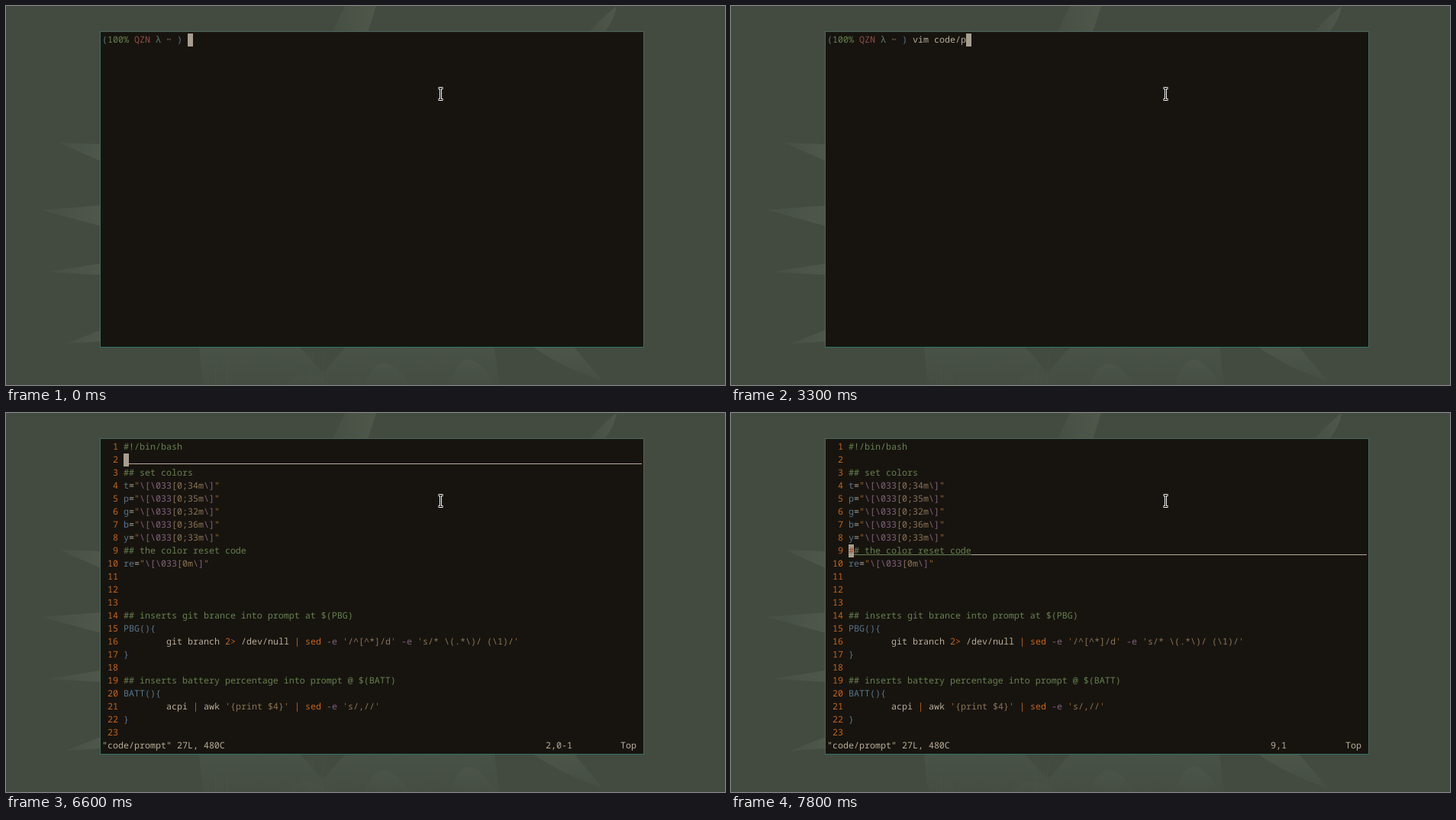
Recreate the animation shown at these times as an HTML page. Size 942x496 px, loop 8 s.

```html
<!DOCTYPE html>
<html lang="en">
<head>
<meta charset="utf-8">
<title>Terminal session</title>
<style>
  html, body { margin: 0; width: 100%; height: 100%; overflow: hidden; background: #434b40; }
  svg { display: block; width: 942px; height: 496px; }
  text { font: 11.667px "Noto Sans Mono", "DejaVu Sans Mono", monospace; white-space: pre; text-rendering: geometricPrecision; }
</style>
</head>
<body>
<svg id="stage" viewBox="0 0 942 496">
  <defs>
    <linearGradient id="fade">
      <stop offset="0" stop-color="#4e574a" stop-opacity=".35"/>
      <stop offset="1" stop-color="#4e574a"/>
    </linearGradient>
    <linearGradient id="petal" x2="0" y2="1">
      <stop offset="0" stop-color="#4c5548"/>
      <stop offset="1" stop-color="#464e43"/>
    </linearGradient>
  </defs>
  <rect width="942" height="496" fill="#434b40"/>
  <g fill="url(#fade)">
    <path d="M428 34L444 0H485L474 34Z"/>
    <path d="M764 34Q782 14 800 0Q798 16 784 34Z"/>
    <path d="M70 179L124 181V203Z"/>
    <path d="M47 267L124 261V288Z"/>
    <path d="M54 348L124 337V352Z"/>
    <path d="M78 442L124 424V439Z"/>
  </g>
  <g fill="url(#petal)">
    <path d="M253 446H385L415 480L445 446H640L646 496H258Z" opacity=".7"/>
    <path d="M690 446H744L782 491Q730 474 690 446Z"/>
    <path d="M365 496Q395 470 425 496ZM470 496Q490 440 530 496ZM582 496Q600 430 642 496Z"/>
  </g>
  <g id="rays" stroke="#4e574a" fill="none" opacity=".6"></g>
  <rect x="123.5" y="33.5" width="712" height="413" fill="#17140f" stroke="#4a645a"/>
  <path d="M123 446.5H836" stroke="#2f7168"/>
  <g id="shell"></g>
  <g id="editor"></g>
  <g id="caret"></g>
  <g fill="none">
    <path id="beam" d="M566.5 107.5H572.5M569.5 107.5V122.5M566.5 122.5H572.5" stroke="#fff" stroke-width="3"/>
    <path d="M567 107.5H572M569.5 107.5V122.5M567 122.5H572" stroke="#000"/>
  </g>
</svg>
<script>
const CELL = 7, ROW = 17, LEFT = 126, TOP = 36, LOOP = 8000, CODE_COL = 4;
const color = {
  cream: '#b8ac98', green: '#66804f', blue: '#57758a', orange: '#c4641b',
  purple: '#84617c', tan: '#8b7355', red: '#8f4f48', quote: '#a1662c',
  block: '#a89e8f', teal: '#5b806a'
};
const byId = id => document.getElementById(id);
const shell = byId('shell'), editor = byId('editor'), caret = byId('caret');

function add(parent, tag, attrs, content) {
  const node = document.createElementNS('http://www.w3.org/2000/svg', tag);
  for (const key in attrs) node.setAttribute(key, attrs[key]);
  if (content) node.textContent = content;
  return parent.appendChild(node);
}

const xOf = col => LEFT + col * CELL;
const yOf = row => TOP + row * ROW;
const write = (parent, row, col, content, fill) =>
  add(parent, 'text', { x: xOf(col), y: yOf(row) + 12, fill }, content);
const box = (parent, x, y, width, height, fill) =>
  add(parent, 'rect', { x, y, width, height, fill });

// Calls visit(hue, text, column) for each coloured run.
function eachRun(runs, col, visit) {
  for (const [hue, content] of runs) {
    visit(color[hue], content, col);
    col += content.length;
  }
}
const writeRuns = (parent, row, col, runs) =>
  eachRun(runs, col, (hue, content, at) => write(parent, row, at, content, hue));

const comment = content => [['green', content]];
const quoted = content => [['quote', "'"], ['tan', content], ['quote', "'"]];
const escape = (name, code) => [
  ['blue', name], ['cream', '='], ['quote', '"'], ['purple', '\\[\\033'],
  ['tan', `[${code}m`], ['purple', '\\]'], ['quote', '"']
];
const pipe = ['orange', '| '];
const sed = [['orange', 'sed '], ['purple', '-e ']];

const source = [
  comment('#!/bin/bash'),
  [],
  comment('## set colors'),
  ...['t34', 'p35', 'g32', 'b36', 'y33'].map(s => escape(s[0], '0;' + s.slice(1))),
  comment('## the color reset code'),
  escape('re', '0'),
  [], [], [],
  comment('## inserts git brance into prompt at $(PBG)'),
  [['blue', 'PBG(){']],
  [['cream', '        git branch '], ['orange', '2>'], ['cream', ' /dev/null '], pipe, ...sed,
    ...quoted('/^[^*]/d'), ['purple', ' -e '], ...quoted('s/* \\(.*\\)/ (\\1)/')],
  [['blue', '}']],
  [],
  comment('## inserts battery percentage into prompt @ $(BATT)'),
  [['blue', 'BATT(){']],
  [['cream', '        acpi '], pipe, ['cream', 'awk '], ...quoted('{print $4}'),
    ['cream', ' '], pipe, ...sed, ...quoted('s/,//')],
  [['blue', '}']],
  []
];

const prompt = [['blue', '('], ['green', '100% '], ['red', 'QZN '], ['teal', 'λ '], ['tan', '~ '], ['blue', ') ']];
const PROMPT_COLS = 16;
const typing = [
  [0, ''], [500, 'v'], [600, 'vim'], [700, 'vim '],
  [1800, 'vim c'], [1900, 'vim co'], [2000, 'vim code/'],
  [3300, 'vim code/p'], [3400, 'vim code/pr'], [3500, 'vim code/prompt ']
];
const ENTER = 3900, OPEN = 4000;
const moves = [6600, 6700, 6900, 7000, 7200, 7400, 7600, 7800];

writeRuns(shell, 0, 0, prompt);
const command = write(shell, 0, PROMPT_COLS, '', color.cream);

source.forEach((runs, row) => {
  write(editor, row, 0, String(row + 1).padStart(3), color.orange);
  writeRuns(editor, row, CODE_COL, runs);
});
write(editor, 23, 0, '"code/prompt" 27L, 480C', color.cream);
write(editor, 23, 97, 'Top', color.cream);
const ruler = write(editor, 23, 83, '', color.cream);

for (let i = 0; i < 12; i++) {
  const x = 262 + i * 5 + (i > 5 ? 95 : 0);
  add(byId('rays'), 'path', { d: `M${x + 8} 447Q${x} 470 ${x + 3} 496`, opacity: .3 + i % 3 * .2 });
}

const drawBlock = (row, col) => box(caret, xOf(col), yOf(row), CELL, ROW, color.block);

function drawShell(time) {
  const typed = typing.filter(([start]) => start <= time).pop()[1];
  command.textContent = typed;
  if (time >= ENTER) drawBlock(1, 0);
  else drawBlock(0, PROMPT_COLS + typed.length);
}

function drawEditor(time) {
  const row = moves.filter(start => start <= time).length;
  const runs = source[row], y = yOf(row) + 13;
  box(caret, xOf(CODE_COL), y, 833 - xOf(CODE_COL), 1, color.cream);
  eachRun(runs, CODE_COL, (hue, content, col) =>
    box(caret, xOf(col), y, content.length * CELL, 1, hue));
  drawBlock(row, CODE_COL);
  if (runs.length) {
    const [hue, content] = runs[0];
    write(caret, row, CODE_COL, content[0], hue === 'green' ? '#a2442f' : '#625d58');
  }
  ruler.textContent = `${row + 1},${runs.length ? '1' : '0-1'}`;
}

const changes = [...typing.map(step => step[0]), ENTER, OPEN, ...moves];
let shown = -1;

function render(time) {
  const step = changes.filter(start => start <= time).length;
  if (step === shown) return;
  shown = step;
  const editing = time >= OPEN;
  shell.style.display = editing ? 'none' : '';
  editor.style.display = editing ? '' : 'none';
  caret.replaceChildren();
  (editing ? drawEditor : drawShell)(time);
}

const begin = performance.now();
function tick() {
  render((performance.now() - begin) % LOOP);
  requestAnimationFrame(tick);
}
tick();
</script>
</body>
</html>
```
